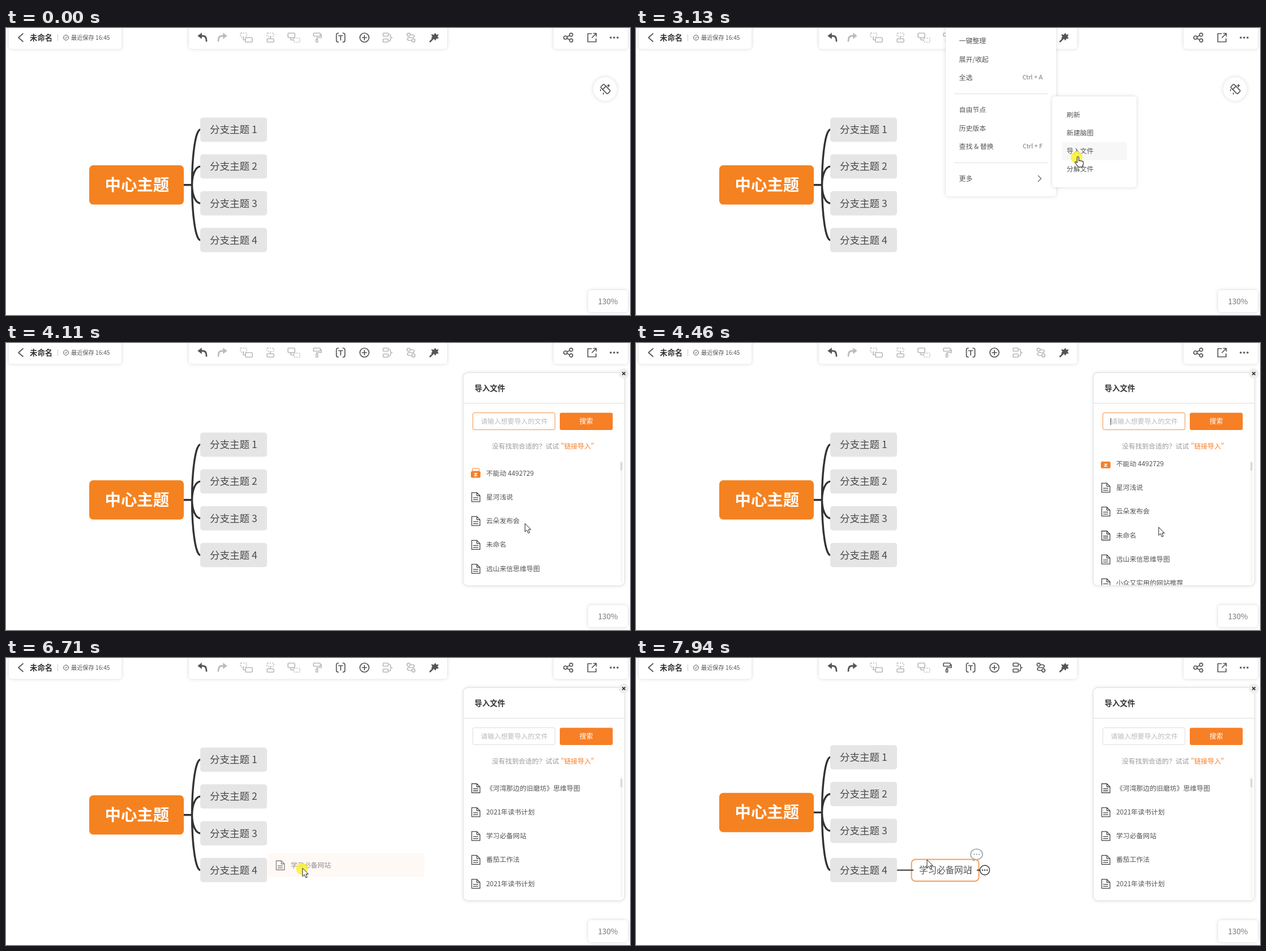
Write an HTML page that moves like this. It is 1102 by 508 pixels and loops after 8 s.

```html
<!DOCTYPE html>
<html lang="zh-CN">
<head>
<meta charset="utf-8">
<title>Mind map import</title>
<style>
html, body { margin: 0; width: 100%; height: 100%; overflow: hidden; background: #fff; }
svg { display: block; width: 1102px; height: 508px; font-family: "Noto Sans CJK SC", "Noto Sans CJK", "Noto Sans", sans-serif; }
text { white-space: pre; }
.card { fill: #fff; filter: drop-shadow(0 0 3px rgba(0,0,0,.16)); }
.ic { fill: none; stroke: #555; stroke-width: 1.7; stroke-linecap: round; stroke-linejoin: round; }
.off { stroke: #bbb; }
.dash { stroke-dasharray: 2 2; stroke-linecap: butt; }
</style>
</head>
<body>
<svg id="stage" viewBox="0 0 1102 508"></svg>
<script>
const ORANGE = '#f58220', HOT = '#f77f26';

// Text centred vertically on cy
const txt = (x, cy, size, s, fill = '#555', more = '') =>
  `<text x="${x}" y="${cy + size * 0.38}" font-size="${size}" fill="${fill}" ${more}>${s}</text>`;
const box = (x, y, w, h, r, more) =>
  `<rect x="${x}" y="${y}" width="${w}" height="${h}" rx="${r}" ${more}/>`;
const card = (x, y, w, h, r = 5) => box(x, y, w, h, r, 'class="card"');
const at = (x, y, body, id = '') => `<g ${id && `id="${id}"`} transform="translate(${x} ${y})">${body}</g>`;
const line = (d, more = '') => `<path d="${d}" ${more}/>`;
const dots = (gap, r, fill) => [-gap, 0, gap].map(x => `<circle cx="${x}" r="${r}" fill="${fill}"/>`).join('');
const icon = (x, y, cls, body, id) => at(x, y, `<g class="ic ${cls}">${body}</g>`, id);

const curved = line('M-6 -3H1Q7 -3 7 6', 'stroke-width="2.8"') +
  line('M-1.5 -8V2L-8 -3Z', 'fill="currentColor" stroke-width="0.6"');

const toolbar = () =>
  icon(347, 17, '', `<g color="#555">${curved}</g>`) +
  icon(382, 17, 'off', `<g transform="scale(-1 1)">${curved}</g>`, 'redo') +
  icon(424, 17, 'off', box(-10, -8, 11, 7, 1, 'class="dash"') + line('M-5 -1V4H-1') + box(-1, 0, 12, 8, 1.5, '')) +
  icon(467, 17, 'off', box(-6, -8, 12, 6, 1, 'class="dash"') + line('M0 -2V2') + box(-6, 2, 12, 6, 1.5, '')) +
  icon(508, 17, 'off', box(-10, -8, 12, 8, 1.5, '') + line('M-5 0V4H0') + box(0, 1, 11, 7, 1, 'class="dash"')) +
  icon(549, 17, 'off', box(-6, -8, 12, 5.5, 1, '') + line('M6 -5H8V0H0V3') + box(-1.5, 3, 3, 5, 0.5, ''), 'brush') +
  icon(591, 17, '', line('M-4 -8Q-7.5 -8 -7.5 -5V5Q-7.5 8 -4 8M4 -8Q7.5 -8 7.5 -5V5Q7.5 8 4 8M-3.5 -3.5H3.5M0 -3.5V4.5')) +
  icon(633, 17, '', '<circle r="8"/>' + line('M-4 0H4M0 -4V4')) +
  icon(674, 17, 'off', box(-8, -8, 9, 5.5, 1, '') + box(-8, 2.5, 9, 5.5, 1, '') +
    line('M3 -6Q5 -6 5 -3Q5 0 8 0Q5 0 5 3Q5 6 3 6'), 'sum') +
  icon(715, 17, 'off', '<circle cx="-4" cy="-5" r="2.8"/><circle cx="4.5" cy="5" r="2.8"/>' +
    line('M-1 -5H3Q6 -5 6 -2.5Q6 0 3 0H-3Q-6 0 -6 2.5Q-6 5 -3 5H1'), 'link') +
  icon(756, 17, '', line('M-7 7L-1 1', 'stroke-width="2.6"') +
    line('M2 -7L3.5 -4L7 -5L5 -2L7 1L3.5 1L2 4L0 1L-4 1L-2 -2L-4 -5L0 -4Z', 'fill="#555"'));

const header = () =>
  card(5, -8, 199, 45) + card(323, -8, 456, 45) + card(967, -8, 131, 45) +
  icon(26, 17, '', line('M4 -7L-4 0L4 7')) +
  txt(42, 17, 13.4, '未命名', '#333', 'font-weight="700"') +
  line('M91.5 11V23', 'stroke="#ccc"') +
  icon(106, 17, '', '<circle r="4.5" stroke-width="1"/>' + line('M-2 0L-.5 1.5L2 -1.5', 'stroke-width="1"')) +
  txt(115, 17, 10.2, '最近保存 16:45', '#555') + toolbar() +
  icon(993, 17, '', '<circle cx="-5" r="3"/><circle cx="5" cy="-5" r="2.8"/><circle cx="5" cy="5" r="2.8"/>' +
    line('M-2.3 -1.4L2.5 -3.7M-2.3 1.4L2.5 3.7')) +
  icon(1035, 17, '', line('M-1 -7H-7.5V7.5H7V2M2.5 -7.5H7.5V-2.5M7 -7L0 0')) +
  at(1074, 17, dots(6, 1.8, '#555')) +
  '<circle cx="1058" cy="108" r="21" class="card"/>' +
  icon(1058, 108, '', `<g transform="rotate(-45)">${box(-3.5, -8, 8, 17, 1.5, '')}${line('M-3.5 -2.5H4.5')}</g>` +
    line('M6 -8V-4M4 -6H8M-8 1V3M-3 7V9')) +
  card(1028, 464, 70, 39) + txt(1063, 484, 13.5, '130%', '#777', 'text-anchor="middle"');

const branch = i => `<g id="b${i}">${box(343, -21.5, 118, 43, 5, 'fill="#e5e5e5"')}` +
  txt(360, -0.3, 17.5, `分支主题 ${i + 1}`, '#4a4a4a', 'font-weight="300"') + '</g>';

const map = () =>
  '<path id="wires" fill="none" stroke="#333" stroke-width="3.4"/>' +
  `<g id="root">${box(147, -34.7, 167, 69.5, 7, `fill="${ORANGE}"`)}` +
  txt(174.5, -0.7, 28.4, '中心主题', '#fff', 'font-weight="700"') + '</g>' +
  [0, 1, 2, 3].map(branch).join('') +
  box(340.5, 351.5, 123, 47.5, 7, `id="drop" fill="none" stroke="${ORANGE}" stroke-width="2"`) +
  '<g id="leaf">' + box(486.5, 356.5, 119, 38.5, 7, 'fill="#fff" stroke="#f5a05a" stroke-width="2"') +
  line('M461 375.5H490M602 375.5H608', 'stroke="#333" stroke-width="2"') +
  txt(500, 374.7, 15.5, '学习必备网站', '#555', 'font-weight="300"') +
  line('M591.5 368V382', 'stroke="#333"') +
  at(616, 375.5, '<circle r="8.5" fill="#fff" stroke="#333" stroke-width="1.4"/>' + dots(4, 1.2, '#333')) +
  at(601.5, 347.5, line('M-5 8L-6 11L-1 9.5', 'fill="#fff" stroke="#aaa" stroke-width="1.5"') +
    '<ellipse rx="10.5" ry="9.3" fill="#fff" stroke="#aaa" stroke-width="1.8"/>' + dots(4.5, 1.2, '#aaa')) + '</g>';

const menu = () => {
  const rows = [[22, '一键整理'], [55, '展开/收起'], [87, '全选', 'Ctrl + A'], [144, '自由节点'],
    [177, '历史版本'], [209, '查找 &amp; 替换', 'Ctrl + F'], [266, '更多']];
  return '<g id="menu">' + card(547, -20, 195, 318) +
    box(562, 250, 165, 32, 3, 'id="moreRow" fill="#f7f7f7"') +
    rows.map(([y, s, key]) => txt(570.5, y, 11.9, s) +
      (key ? txt(718, y, 10.9, key, '#777', 'text-anchor="end"') : '')).join('') +
    line('M562 116.5H727M562 238.5H727', 'stroke="#ddd"') +
    line('M710 261L715.5 266.5L710 272', 'fill="none" stroke="#666" stroke-width="1.2"') + '</g>' +
    '<g id="sub">' + card(735, 121, 149, 161) +
    box(752, 202, 115, 32, 2, 'id="importRow" fill="#f7f7f7"') +
    ['刷新', '新建脑图', '导入文件', '分解文件'].map((s, i) => txt(760.5, 153 + i * 32.2, 11.9, s)).join('') + '</g>';
};

const fileIcon = at(829.5, 0.5, '<g class="ic" style="stroke:#444;stroke-width:1.3">' +
  line('M-7 -8H2L7.5 -2.5V8H-7ZM2 -8V-2.5H7.5M-4 1H4M-4 4.5H4') + '</g>');
const folderIcon = at(829.5, 0, box(-6, -8, 12, 5, 1, `fill="none" stroke="${HOT}"`) +
  box(-8.5, -3, 17, 11.5, 2, `fill="${HOT}"`) +
  line('M-3 1H2L-2 5H3', 'fill="none" stroke="#fff" stroke-width="1.4"'));
const entry = (s, i) => at(0, 230 + i * 42.3, (i ? fileIcon : folderIcon) + txt(848, 0, 11.85, s));

const files = ['不能动 4492729', '星河浅说', '云朵发布会', '未命名', '远山来信思维导图', '小众又实用的网站推荐',
  '《河湾那边的旧磨坊》思维导图', '2021年读书计划', '学习必备网站', '番茄工作法', '2021年读书计划'];

const panel = () => '<g id="panel">' + card(808, 53, 284, 376.5, 8) +
  box(807.5, 52.5, 285, 377, 8, 'fill="none" stroke="#e2e2e2"') +
  txt(827.5, 79.7, 13.5, '导入文件', '#333', 'font-weight="700"') +
  line('M808 106.5H1092', 'stroke="#ddd"') +
  box(824.5, 123.5, 145, 30, 2.5, 'id="input" fill="#fff"') +
  txt(838.5, 138.7, 11.85, '请输入想要导入的文件', '#bbb') +
  line('M838.5 133V145', 'id="caret" stroke="#333"') +
  box(978, 123.5, 93.5, 30.5, 3, `fill="${HOT}"`) +
  txt(1024.7, 138.7, 12, '搜索', '#fff', 'text-anchor="middle" font-weight="500"') +
  txt(858, 182.7, 11.85, '没有找到合适的？试试', '#999') + txt(980, 182.7, 11.85, '"链接导入"', HOT) +
  `<g id="empty">${txt(848, 225, 11.85, `没有文件，请<tspan fill="${HOT}">“新建”</tspan>或<tspan fill="${HOT}">“链接导入”</tspan>`, '#999')}</g>` +
  '<g id="files"><g clip-path="url(#listClip)">' + box(808, 294, 278, 42, 0, 'id="hover" fill="#fff8f4"') +
  `<g id="list">${files.map(entry).join('')}</g></g>` +
  box(1085, 209, 4, 216, 2, 'fill="#f7f7f7"') + box(1085, 0, 3.5, 15.5, 1.7, 'id="thumb" fill="#d9d9d9"') + '</g>' +
  box(809, 107, 282, 321, 7, 'id="mask" fill="#fff"') +
  at(1091, 54, '<circle r="9" fill="#eee"/>' + line('M-2.7 -2.7L2.7 2.7M2.7 -2.7L-2.7 2.7', 'stroke="#333" stroke-width="1.8"')) + '</g>';

const stage = document.getElementById('stage');
stage.innerHTML = '<defs><clipPath id="listClip"><rect x="808" y="209" width="284" height="219.5"/></clipPath></defs>' +
  '<rect width="1102" height="508" fill="#fff"/>' + map() + header() + menu() + panel() +
  `<g id="ghost">${box(808, -21, 276, 42, 0, 'fill="#fff8f4" opacity=".8"')}<g opacity=".65">${fileIcon}${txt(848, 0, 11.85, '学习必备网站')}</g></g>` +
  '<rect id="veil" width="1102" height="508" fill="#fff"/>' +
  `<path id="spinA" fill="none" stroke="${HOT}" stroke-width="2"/><path id="spinB" fill="none" stroke="${HOT}" stroke-width="1.6"/>` +
  '<g id="pointer"><circle id="click" cx="-1" cy="1" r="10.5" fill="#fbf02c" opacity=".82"/>' +
  line('M0 0V14.5L3.3 11.5L5.7 17L8.2 16L5.9 10.5H10.3Z', 'id="arrow" fill="#fff" stroke="#222" stroke-linejoin="round"') +
  line('M0 1.5Q0 -.5 1.5 -.5T3 1.5V7Q4.5 6 6 7.3Q7.5 6.5 8.5 8Q11 7.5 11 10V13L9 18H2L-3.5 10.5Q-4 8.5 -2 8.8L0 10.5Z',
    'id="hand" fill="#fff" stroke="#222" stroke-width="1.1" stroke-linejoin="round"') + '</g>';

const el = {};
stage.querySelectorAll('[id]').forEach(n => el[n.id] = n);
const set = (id, name, v) => el[id].setAttribute(name, v);
const show = (id, on) => { el[id].style.display = on ? '' : 'none'; };
const move = (id, x, y) => set(id, 'transform', `translate(${x} ${y})`);

// Piecewise linear value; each key is [time, ...values]
function track(keys, t) {
  const n = keys.findIndex(k => k[0] > t);
  if (n < 0) return keys[keys.length - 1].slice(1);
  if (!n) return keys[0].slice(1);
  const a = keys[n - 1], b = keys[n], p = (t - a[0]) / (b[0] - a[0]);
  return a.slice(1).map((v, i) => v + (b[i + 1] - v) * p);
}

function arc(cx, cy, r, from, sweep) {
  const pt = d => `${cx + r * Math.cos(d * Math.PI / 180)} ${cy + r * Math.sin(d * Math.PI / 180)}`;
  return `M${pt(from)}A${r} ${r} 0 ${sweep > 180 ? 1 : 0} 1 ${pt(from + sweep)}`;
}

const pointerPath = [[130, 988, 492], [340, 900, 410], [550, 650, 300], [760, 547, 266], [1100, 547, 266],
  [1400, 556, 276], [1770, 575, 282], [1980, 600, 268], [2440, 600, 268], [2750, 745, 262], [3000, 779, 228],
  [3200, 779, 228], [3690, 812, 265], [4040, 915, 318], [4390, 923, 326], [5100, 923, 326], [5630, 880, 319],
  [5760, 880, 319], [5900, 869, 320.5], [5980, 864, 320.5], [6250, 864, 320.5], [6500, 700, 345],
  [6710, 524, 372], [6980, 450, 376], [7110, 450, 376], [7250, 425, 374], [7520, 425, 374], [7940, 514, 357]];
const scrollPath = [[4400, 0], [4460, 16], [4600, 110], [4670, 127], [4870, 127], [5200, 200], [5500, 253.8]];
const veilPath = [[3180, 0], [3400, 0.85], [3500, 0.8], [3690, 0.5], [3900, 0]];
const maskPath = [[3550, 0.9], [3690, 0.55], [4040, 0]];

function draw(t) {
  const within = (a, b) => t >= a && t < b;
  const [px, py] = track(pointerPath, t);
  const added = t >= 7590, lift = added ? 4.3 : 0;

  const rootY = 277.7 - lift;
  const ys = [0, 1, 2, 3].map(i => 180 + i * 65.1 - (i < 3 ? lift : 0));
  move('root', 0, rootY);
  ys.forEach((y, i) => move('b' + i, 0, y));
  set('wires', 'd', `M314 ${rootY}H328.5` + ys.map(y =>
    `M328.5 ${rootY}A14.5 ${Math.abs(y - rootY)} 0 0 ${y < rootY ? 1 : 0} 343 ${y}`).join(''));
  show('leaf', added);
  show('drop', within(6900, 7590));
  ['redo', 'brush', 'sum', 'link'].forEach(id => {
    el[id].firstChild.classList.toggle('off', !added);
    el[id].style.color = added ? '#555' : '#bbb';
  });

  show('menu', within(1100, 3200));
  show('sub', within(1910, 3200));
  show('moreRow', within(1700, 2700));
  show('importRow', t >= 2950);

  show('panel', t >= 3270);
  const left = 1 - Math.min(1, Math.max(0, (t - 3270) / 490));
  move('panel', 295 * left ** 3, 0);
  const focused = t < 5840;
  set('input', 'stroke', focused ? '#f3934a' : '#ddd');
  show('caret', focused && t % 1060 < 530);
  const loaded = t >= 3850;
  show('empty', !loaded);
  show('files', loaded);
  const [scroll] = track(scrollPath, t);
  move('list', 0, -scroll);
  set('thumb', 'y', 210.3 + scroll * 0.0125);
  show('hover', within(5560, 6250));
  set('mask', 'opacity', track(maskPath, t)[0]);

  set('veil', 'opacity', track(veilPath, t)[0]);
  const spin = t - 3690;
  show('spinA', within(3300, 3850));
  show('spinB', within(3480, 3850));
  set('spinA', 'd', arc(551, 254, 20, 28 + spin * 0.18, 18 + Math.abs(spin) * 0.3));
  set('spinB', 'd', arc(951, 268.5, 15.8, 150 + spin * 0.18, 133 + spin * 0.2));

  show('ghost', within(5950, 7220));
  move('ghost', px - 869, 315 + py - 320.5);

  show('pointer', t >= 130);
  move('pointer', px, py);
  const hand = within(1700, 3200);
  show('hand', hand);
  show('arrow', !hand);
  show('click', within(1030, 1170) || within(3060, 3200) || within(5840, 7220));
}

const start = performance.now();
function tick() {
  draw((performance.now() - start) % 8000);
  requestAnimationFrame(tick);
}
draw(0);
requestAnimationFrame(tick);
</script>
</body>
</html>
```
